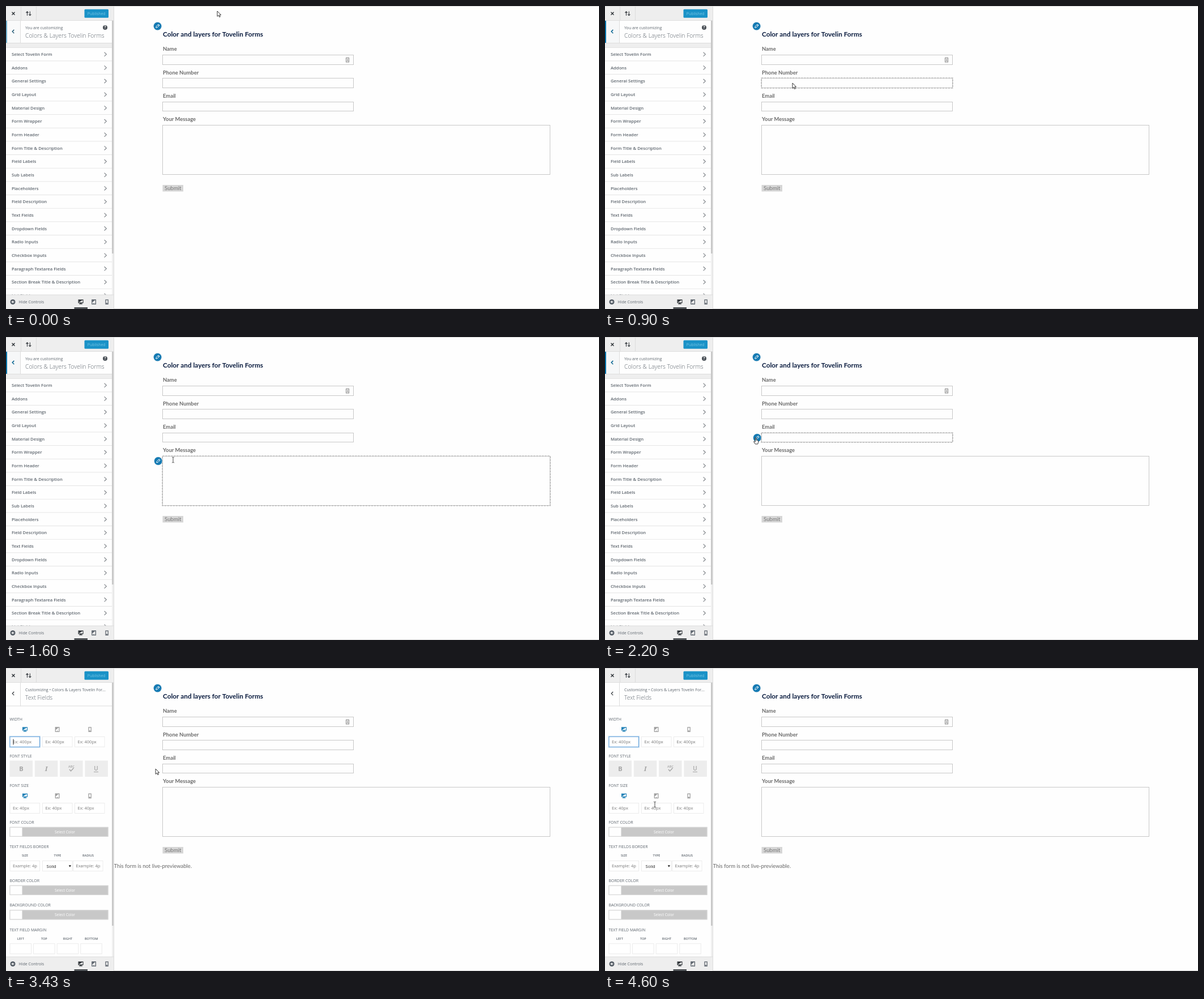
An HTML page with a canvas that plays this animation: 1047x535 px, repeating every 4.63 s.

```html
<!DOCTYPE html>
<html lang="en">
<head>
<meta charset="utf-8">
<title>Form customizer</title>
<style>
html, body { margin: 0; width: 100%; height: 100%; overflow: hidden; background: #fefefe; }
canvas { display: block; }
</style>
</head>
<body>
<canvas id="stage" width="1047" height="535"></canvas>
<script>
const c = document.getElementById('stage').getContext('2d');
const LOOP = 4630;
const SANS = '"Open Sans", "Noto Sans", sans-serif';
const FORM = 'Lato, "Open Sans", sans-serif';
const BLUE = '#147ab3', INK = '#5e666e', LINE = '#dddddd';

const MENU = ['Select Tovelin Form', 'Addons', 'General Settings', 'Grid Layout',
  'Material Design', 'Form Wrapper', 'Form Header', 'Form Title & Description',
  'Field Labels', 'Sub Labels', 'Placeholders', 'Field Description', 'Text Fields',
  'Dropdown Fields', 'Radio Inputs', 'Checkbox Inputs', 'Paragraph Textarea Fields',
  'Section Break Title & Description', 'List Fields'];

const FIELDS = {
  header: [271, 41, 699, 19],
  name: [276.5, 86.5, 337, 17],
  phone: [276.5, 127.5, 337, 17],
  email: [276.5, 169.5, 337, 16],
  area: [276.5, 210.5, 684, 87]
};

// field, outline start, outline end, pencil start
const HOVERS = [
  ['header', 440, 540, 9999], ['name', 620, 730, 9999], ['phone', 830, 1030, 930],
  ['email', 1090, 1170, 9999], ['area', 1290, 2010, 1430], ['email', 2060, 2650, 2090]
];

// time, x, y of the pointer
const PATH = [
  [330, 373, 9], [500, 371, 50], [680, 352, 95], [860, 331, 136], [920, 331, 136],
  [1120, 316, 177], [1380, 297, 216], [1580, 295, 217], [1920, 295, 217],
  [2190, 266, 178], [3200, 266, 178], [3240, 265, 178], [3420, 265, 178],
  [3680, 56, 182], [3950, 56, 182], [4440, 88, 240], [4560, 88, 241]
];

const ramp = (t, a, b) => Math.min(1, Math.max(0, (t - a) / (b - a)));
const ease = p => p * p * (3 - 2 * p);
const within = (t, a, b) => t >= a && t < b;

function pointer(t) {
  if (t <= PATH[0][0]) return PATH[0].slice(1);
  for (let i = 1; i < PATH.length; i++) {
    const [t0, x0, y0] = PATH[i - 1], [t1, x1, y1] = PATH[i];
    if (t < t1) {
      const p = ease(ramp(t, t0, t1));
      return [x0 + (x1 - x0) * p, y0 + (y1 - y0) * p];
    }
  }
  return PATH[PATH.length - 1].slice(1);
}

function fill(x, y, w, h, color) {
  c.fillStyle = color;
  c.fillRect(x, y, w, h);
}

function box(x, y, w, h, color, width = 1) {
  c.strokeStyle = color;
  c.lineWidth = width;
  c.strokeRect(x, y, w, h);
}

function line(color, width, ...pts) {
  c.strokeStyle = color;
  c.lineWidth = width;
  c.beginPath();
  for (let i = 0; i < pts.length; i += 2) c.lineTo(pts[i], pts[i + 1]);
  c.stroke();
}

function shape(color, ...pts) {
  c.fillStyle = color;
  c.beginPath();
  for (let i = 0; i < pts.length; i += 2) c.lineTo(pts[i], pts[i + 1]);
  c.closePath();
  c.fill();
}

function disc(x, y, r, color) {
  c.fillStyle = color;
  c.beginPath();
  c.arc(x, y, r, 0, 7);
  c.fill();
}

// y is the middle of the capitals
function text(s, x, y, size, color = INK, weight = 400, align = 'left', family = SANS) {
  c.font = `${weight} ${size}px ${family}`;
  c.fillStyle = color;
  c.textAlign = align;
  c.fillText(s, x, y + size * 0.36);
}

function clipped(x, y, w, h, draw) {
  c.save();
  c.beginPath();
  c.rect(x, y, w, h);
  c.clip();
  draw();
  c.restore();
}

function desktop(x, y, color) {
  fill(x - 4.5, y - 4, 9, 6.2, color);
  fill(x - 3.5, y - 3, 7, 4, '#ffffff');
  shape(color, x - 3.5, y - 3, x + 3.5, y - 3, x - 3.5, y + 0.6);
  fill(x - 1, y + 2, 2, 1.3, color);
  fill(x - 2.8, y + 3, 5.6, 1.2, color);
}

function tablet(x, y, color) {
  box(x - 3.2, y - 3.6, 6.6, 7.6, color, 1.2);
  shape(color, x - 2.8, y - 3, x + 2.4, y - 3, x - 2.8, y + 1);
  fill(x - 0.6, y + 2.2, 1.4, 1.2, color);
}

function phone(x, y, color) {
  box(x - 2, y - 3.5, 4.2, 7.5, color, 1.2);
  fill(x - 1, y + 2, 2, 1.5, color);
}

function devices(xs, y, active, rest) {
  desktop(xs[0], y, active);
  tablet(xs[1], y, rest);
  phone(xs[2], y, rest);
}

function pencil(x, y, alpha = 1) {
  c.save();
  c.globalAlpha = alpha;
  disc(x, y, 7.5, '#dde6ec');
  disc(x, y, 6.9, BLUE);
  c.translate(x, y);
  c.rotate(Math.PI / 4);
  c.strokeStyle = '#fff';
  c.lineWidth = 0.9;
  c.beginPath();
  c.moveTo(-1.3, -3.6);
  c.lineTo(1.3, -3.6);
  c.lineTo(1.3, 2);
  c.lineTo(0, 4);
  c.lineTo(-1.3, 2);
  c.closePath();
  c.moveTo(-1.3, -2.1);
  c.lineTo(1.3, -2.1);
  c.stroke();
  c.restore();
}

function sectionHead(small, big, height, focus) {
  fill(0, 26, 187, height, '#fefefe');
  if (focus) {
    c.globalAlpha = focus;
    fill(0, 26, 25, height - 1, '#f6f7f8');
    fill(0, 26, 2, height - 1, '#0073aa');
    c.globalAlpha = 1;
  }
  fill(25, 26, 1, height, LINE);
  fill(0, 25 + height, 187, 1, LINE);
  const arrow = [14.2, 42, 11.2, 45.1, 14.2, 48.2];
  line('#32373c', 1.2, ...arrow);
  if (focus) {
    c.globalAlpha = focus;
    line('#0073aa', 1.2, ...arrow);
    c.globalAlpha = 1;
  }
  text(small, 34, 38, 7.1);
  text(big, 34, 52, 10.4, INK, 300);
}

function menuPanel(focus) {
  fill(0, 26, 187, 484, '#eeeeee');
  sectionHead('You are customizing', 'Colors & Layers Tovelin Forms', 40, focus);
  disc(175, 38, 4, '#4a5057');
  text('?', 175, 38.1, 6.5, '#fff', 700, 'center');
  fill(0, 73, 187, 1, LINE);
  MENU.forEach((label, i) => {
    const y = 73.8 + i * 23.66;
    fill(0, y, 187, 22.9, '#fefefe');
    fill(0, y + 22.8, 187, 0.9, '#e2e2e2');
    text(label, 10, y + 11.5, 7.7, INK, 600);
    line('#7d8287', 1.15, 173.6, y + 7.9, 177.3, y + 11.5, 173.6, y + 15.1);
  });
}

function input(x, y, w, label = '', focused = false) {
  fill(x, y, w, 19, '#fff');
  if (focused) {
    box(x - 0.5, y - 0.5, w + 1, 20, '#c9dff3', 1);
    box(x + 0.5, y + 0.5, w - 1, 18, '#5b9dd9');
  } else {
    box(x + 0.5, y + 0.5, w - 1, 18, '#ececec');
  }
  clipped(x, y, w - 5, 19, () => text(label, x + 5.5, y + 9.6, 7.5, '#777'));
}

function heading(s, y) {
  text(s, 6.5, y, 7);
}

function colorRow(label, y) {
  heading(label, y);
  fill(6.5, y + 8.5, 174, 17, '#c8c8c8');
  fill(7, y + 9, 21.5, 16, '#fefefe');
  box(7, y + 9, 173, 16, '#d6d6d6');
  text('Select Color', 104, y + 17.2, 6.55, '#fff', 400, 'center');
}

function sideRow(label, y) {
  heading(label, y);
  ['LEFT', 'TOP', 'RIGHT', 'BOTTOM'].forEach((s, i) => {
    text(s, 25.8 + i * 41.6, y + 15.5, 5.5, INK, 600, 'center');
    input(6.5 + i * 41.6, y + 24, 38.5);
  });
}

function sizeRow(label, y, hint, focused) {
  heading(label, y);
  devices([33.5, 90.5, 148], y + 18.3, BLUE, '#999');
  [6.5, 64, 121].forEach((x, i) => input(x, y + 30.8, 53.5, hint, focused && !i));
}

function fieldPanel(caret) {
  fill(0, 26, 187, 560, '#fefefe');
  sectionHead('Customizing • Colors & Layers Tovelin For...', 'Text Fields', 41.5, 0);
  sizeRow('WIDTH', 90, 'Ex: 400px', true);
  if (caret) fill(12.5, 125.5, 1, 10, '#222');

  heading('FONT STYLE', 155);
  for (let i = 0; i < 4; i++) fill(6.5 + i * 44.3, 163.5, 40.5, 28.5, '#ededed');
  text('B', 27, 178.3, 11, '#a5a5a5', 700, 'center');
  text('I', 71, 178.3, 11.5, '#a5a5a5', 'italic 700', 'center', '"Noto Serif", serif');
  text('ABC', 115.5, 174.5, 5.5, '#a5a5a5', 600, 'center');
  line('#a5a5a5', 1.4, 112, 179, 114.5, 182, 119.5, 176.5);
  text('U', 159, 177.5, 10, '#a5a5a5', 600, 'center');
  fill(155, 183, 8, 1, '#a5a5a5');

  sizeRow('FONT SIZE', 207.3, 'Ex: 40px');
  colorRow('FONT COLOR', 272.3);

  heading('TEXT FIELDS BORDER', 315.8);
  [['SIZE', 33.5], ['TYPE', 91], ['RADIUS', 145]].forEach(([s, x]) =>
    text(s, x, 331.2, 5.5, INK, 600, 'center'));
  input(6.5, 340, 53.5, 'Example: 4px');
  input(64, 340, 53.5);
  text('Solid', 71.5, 350, 7.6, '#222');
  shape('#222', 110.8, 348.3, 115, 348.3, 112.9, 351.8);
  input(118, 340, 53.5, 'Example: 4px');

  colorRow('BORDER COLOR', 375.3);
  colorRow('BACKGROUND COLOR', 418.8);
  sideRow('TEXT FIELD MARGIN', 462.2);
  sideRow('TEXT FIELD PADDING', 520.4);
}

function sidebar(t) {
  const slide = ramp(t, 3130, 3230);
  const scroll = 61 * (ease(ramp(t, 3690, 3900)) - ease(ramp(t, 4120, 4420)));
  const focus = t < 2560 ? 0.55 + 0.45 * ramp(t, 50, 130) : 1 - ramp(t, 2560, 2660);
  const caret = t < 3260 || Math.floor((t - 3260) / 250) % 2 === 0;

  fill(0, 0, 190, 535, '#eeeeee');
  clipped(0, 26, 187, 484, () => {
    if (slide < 1) {
      c.save();
      c.translate(-187 * slide, 0);
      menuPanel(focus);
      c.restore();
    }
    if (slide > 0) {
      c.translate(187 * (1 - slide), -scroll);
      fieldPanel(caret);
    }
  });
  fill(187, 26, 3, 484, '#efefef');
  fill(187, 26 + (slide < 1 ? 0 : scroll * 0.886), 2.6, slide < 1 ? 411 : 429, '#c6c6c6');

  // top bar
  fill(0, 25, 190, 1, LINE);
  fill(26, 0, 1, 25, LINE);
  fill(53, 0, 1, 25, LINE);
  line('#32373c', 1.4, 10.5, 10.7, 15.5, 15.7);
  line('#32373c', 1.4, 15.5, 10.7, 10.5, 15.7);
  line('#32373c', 1.1, 37.5, 17, 37.5, 10);
  line('#32373c', 1.1, 35.4, 12, 37.5, 9.8, 39.6, 12);
  line('#32373c', 1.1, 42.3, 9.5, 42.3, 16.5);
  line('#32373c', 1.1, 40.2, 14.6, 42.3, 16.8, 44.4, 14.6);
  c.fillStyle = '#1a92c7';
  c.beginPath();
  c.roundRect(138.5, 5.8, 42.5, 15, 1.6);
  c.fill();
  text('Published', 159.7, 13.2, 6.9, '#78c6e6', 400, 'center');

  // bottom bar
  fill(0, 510, 190, 25, '#eeeeee');
  fill(0, 509.5, 190, 1, LINE);
  disc(12, 522.5, 4.5, '#555d66');
  shape('#eee', 9.2, 522.5, 12.6, 519.9, 12.6, 525.1);
  fill(12, 521.8, 2.4, 1.4, '#eee');
  text('Hide Controls', 22.5, 522.5, 7.05);
  devices([132, 155, 178], 522.3, '#191e23', '#555d66');
  fill(120.5, 532.3, 23.5, 2.2, '#191e23');
  fill(190, 0, 1, 535, LINE);
}

function preview(t) {
  const label = (s, y) => text(s, 277, y, 9.4, '#6a6a6a', 700, 'left', FORM);
  text('Color and layers for Tovelin Forms', 277, 50, 11.75, '#0a1c3f', 700, 'left', FORM);
  label('Name', 76);
  label('Phone Number', 117.5);
  label('Email', 158.8);
  label('Your Message', 200);
  for (const key of ['name', 'phone', 'email', 'area']) box(...FIELDS[key], '#c8c8c8');

  box(600.5, 91.5, 5, 7.5, '#888');
  fill(602.5, 93, 1.2, 4, '#888');
  fill(601.8, 96.6, 2.6, 0.8, '#888');

  fill(276.5, 316, 36.5, 11.5, '#d6d6d6');
  text('Submit', 294.8, 321.8, 9.6, '#777', 400, 'center', FORM);
  if (t >= 2650)
    text('This form is not live-previewable.', 190.5, 349.2, 9.5, '#666', 400, 'left', FORM);

  pencil(267.6, 35.6);
  for (const [key, start, end, mark] of HOVERS) {
    if (!within(t, start, end)) continue;
    const [x, y, w, h] = FIELDS[key];
    c.setLineDash([3.3, 1.7]);
    box(x - 0.3, y - 0.3, w + 0.6, h + 0.6, '#b0b0b0', 1.6);
    c.setLineDash([]);
    if (t >= mark) pencil(x - 7.8, y + 8.5, ramp(t, mark, mark + 110));
  }
}

function ibeam(x, y) {
  const color = '#4a4a4a';
  line(color, 1, x, y - 4, x, y + 4);
  for (const s of [-1, 1])
    line(color, 1, x - 2, y + 5 * s, x - 0.6, y + 4.6 * s, x, y + 4 * s,
      x + 0.6, y + 4.6 * s, x + 2, y + 5 * s);
}

function outlined(path) {
  c.fillStyle = '#fff';
  c.fill(path);
  c.strokeStyle = '#222';
  c.lineWidth = 0.9;
  c.stroke(path);
}

const ARROW = new Path2D('M0 0V9.4L2.2 7.4L3.8 10.6L5.3 9.9L3.8 6.8H6.6Z');
const HAND = new Path2D('M-.8 0Q0 -1 .8 0V4L2.2 4.1L3.5 4.6L4.7 5.2V8L3.7 11H-.7' +
  'L-3.3 7.2Q-3.6 5.9 -2.4 6.2L-.8 7.4Z');

function cursor(t) {
  const [x, y] = pointer(t);
  const typing = within(t, 640, 730) || within(t, 930, 1030) || within(t, 1100, 1170) ||
    within(t, 1290, 2010) || t >= 3650;
  if (typing) return ibeam(x, y);
  c.save();
  c.translate(x, y);
  outlined(within(t, 2150, 3220) ? HAND : ARROW);
  c.restore();
}

function frame(now) {
  const t = now % LOOP;
  fill(0, 0, 1047, 535, '#fefefe');
  preview(t);
  sidebar(t);
  fill(0, 0, 1047, 1, '#d8d8d8');
  fill(190, 534, 857, 1, '#d8d8d8');
  cursor(t);
}

let begin = null;
function tick(now) {
  if (begin === null) begin = now;
  frame(now - begin);
  requestAnimationFrame(tick);
}
requestAnimationFrame(tick);
</script>
</body>
</html>
```
